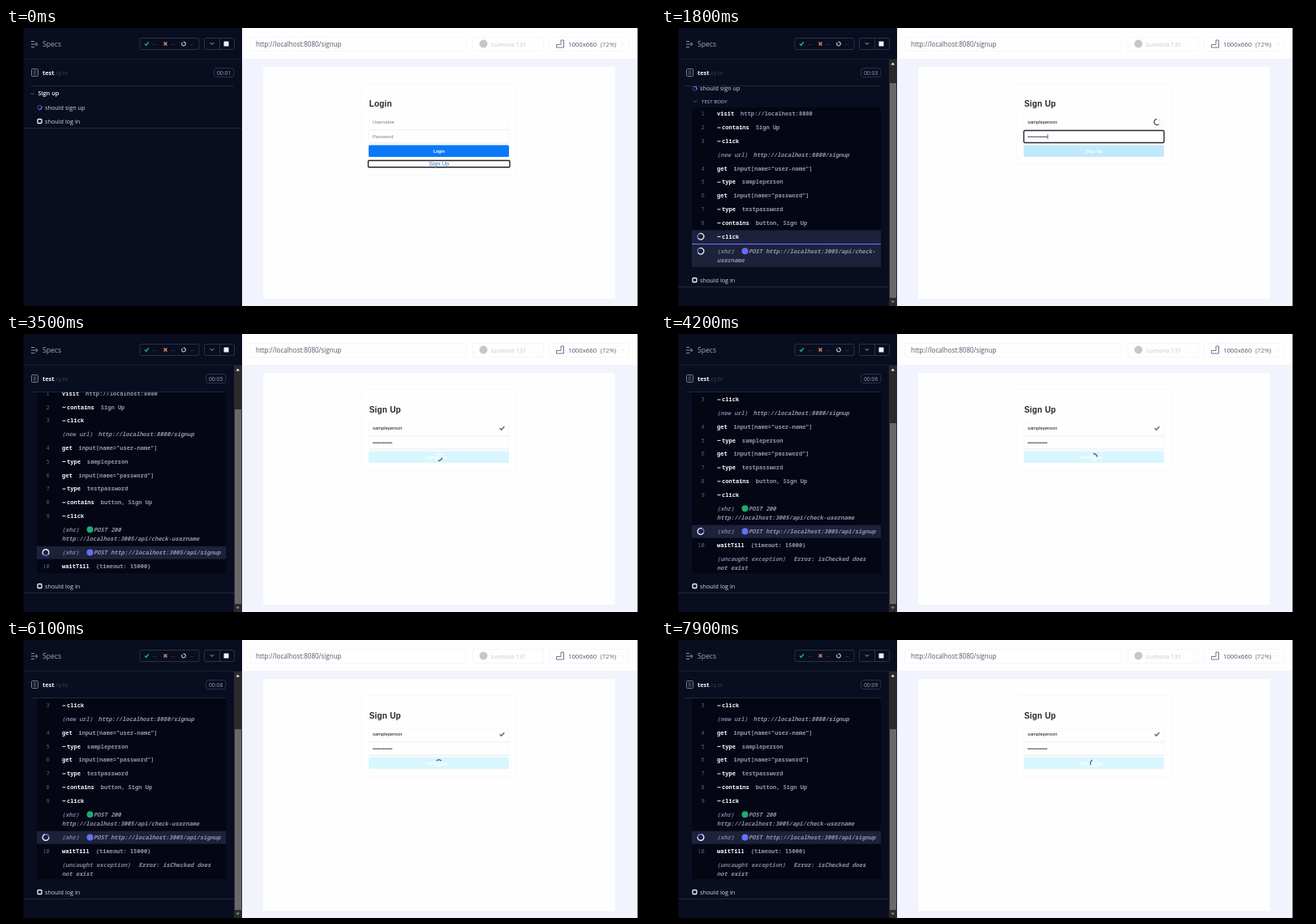
Animation, 800 px wide and 343 px high, one loop 8000 ms. Source, as an HTML page:

```html
<!DOCTYPE html>
<html lang="en">
<head>
<meta charset="utf-8">
<title>Sign up test run</title>
<style>
html, body { margin: 0; width: 100%; height: 100%; overflow: hidden; background: #000; }
svg { display: block; width: 800px; height: 343px; }
text { white-space: pre; }
.ui { font-family: "Open Sans", "Noto Sans", sans-serif; }
.mono { font-family: "Noto Sans Mono", "DejaVu Sans Mono", monospace; font-size: 7.05px; }
.form { font-family: "Liberation Sans", Arial, sans-serif; }
</style>
</head>
<body>
<svg viewBox="0 0 800 343">
  <defs><clipPath id="list"><rect x="21" y="72" width="260" height="271"/></clipPath></defs>
  <g id="base"></g>
  <g id="live"></g>
</svg>
<script>
const LOOP = 8000, STEP = 100;
const USER = 'sampleperson', PASS = 'testpassword';
const CHAR = 4.23, ROW = 16.8, WRAP = 11.5;
const WHITE = '#f3f4fa', MUTED = '#9095ad', INDIGO = '#6470f3', GREEN = '#1fa971';

// When each part of the run happens, in ms
const AT = { signup: 200, user: [300, 500], pass: [600, 900], log: 1700, progress: 1860, checked: 3100, error: 4000 };

const attrs = o => Object.entries(o).map(([k, v]) => ` ${k}="${v}"`).join('');
const el = (tag, o, body = '') => `<${tag}${attrs(o)}>${body}</${tag}>`;
const box = (x, y, width, height, fill, o = {}) => el('rect', { x, y, width, height, fill, ...o });
const frame = (x, y, w, h, stroke, rx = 2, o = {}) => box(x, y, w, h, 'none', { stroke, rx, 'stroke-width': 1, ...o });
const path = (d, stroke, width = 1, o = {}) => el('path', { d, stroke, fill: 'none', 'stroke-width': width, ...o });
const dot = (cx, cy, r, fill) => el('circle', { cx, cy, r, fill });
const text = (cls, x, y, s, size, fill, o = {}) => el('text', { class: cls, x, y, 'font-size': size, fill, ...o }, s);
const ui = (...a) => text('ui', ...a);
const form = (...a) => text('form', ...a);
const mono = (x, y, s, fill, o = {}) => el('text', { class: 'mono', x, y: y + 2.4, fill, ...o }, s);
const bold = { 'font-weight': 700 };
const middle = { 'text-anchor': 'middle' };
const slanted = { 'font-style': 'italic', 'font-weight': 600 };
const chevron = (x, y, stroke, r = 2) => path(`M${x - r} ${y - r / 2}l${r} ${r}l${r} ${-r}`, stroke);

// Arc of `sweep` degrees centred on `angle`
function arc(x, y, r, angle, sweep, stroke, width) {
  const at = a => `${x + r * Math.cos(a * Math.PI / 180)} ${y + r * Math.sin(a * Math.PI / 180)}`;
  return path(`M${at(angle - sweep / 2)}A${r} ${r} 0 ${sweep > 180 ? 1 : 0} 1 ${at(angle + sweep / 2)}`, stroke, width);
}

const turn = (t, offset) => (t * 0.36 + offset) % 360;

function spinner(x, y, t) {
  return arc(x, y, 3.8, turn(t, 90), 265, '#e4e6f3', 1.5) + arc(x, y, 3.8, turn(t, 270), 90, INDIGO, 1.5);
}

function testItem(y, label, running, t) {
  const icon = running
    ? arc(41.5, y, 2.5, 0, 359, '#343a70', 1.3) + arc(41.5, y, 2.5, turn(t, 40), 150, INDIGO, 1.3)
    : frame(39, y - 2.5, 5, 5, WHITE, 1, { 'stroke-width': 1.3 });
  return icon + ui(48, y + 2.6, label, 7.25, '#d5d8e6');
}

function drawBase() {
  let s = box(21.5, 0, 270, 343, '#090d20') + box(291, 0, 487.5, 38, '#fefefe') + box(291, 38, 487.5, 305, '#f1f4fd');
  s += box(317, 48, 433.5, 286, '#fefefe');

  // Reporter header
  s += path('M31 16.5h4M31 20h7M31 23.5h4M36.5 17.5l2.5 2.5l-2.5 2.5', '#8b90a8');
  s += ui(45, 23, 'Specs', 8.6, '#a4a8bb');
  s += frame(165, 12.5, 73, 14, '#2b3047') + frame(244.5, 12.5, 37, 14, '#2b3047') + path('M263.5 13v13', '#2b3047');
  s += path('M171 19.5l1.8 1.8l3-4', GREEN, 1.5) + path('M194.5 17.5l4 4m0-4l-4 4', '#c9835a', 1.6);
  s += arc(219, 19.5, 2.4, 60, 320, '#b9bdd0', 1.2);
  for (const x of [181, 204, 227]) s += ui(x, 22, '--', 7, '#4a4f66');
  s += chevron(254, 19.2, '#a4a8bb', 2.2) + box(268.5, 16.5, 6, 6, '#f0f1f8', { rx: 0.5 });
  s += path('M21.5 38.5H291', '#171b30');

  // Spec title
  s += frame(31.5, 50.5, 8, 9, '#777c96', 1) + path('M33.5 53h4M33.5 55h4M33.5 57h4', '#777c96', 0.8);
  s += ui(45, 58, 'test', 7.4, WHITE, bold) + ui(59.5, 58, '.cy.ts', 7.2, '#3f435a');

  // Browser bar
  s += frame(300.5, 11.5, 267, 17, '#f4f5f9') + frame(575.5, 11.5, 87, 17, '#f4f5f9') + frame(669.5, 11.5, 98, 17, '#f4f5f9');
  s += ui(308, 22.6, 'http://localhost:8080/signup', 8.03, '#565a6c');
  s += dot(588.5, 19.5, 5, '#c3cac6') + ui(598, 22.6, 'Lumora 131', 7.85, '#c6c8d2');
  s += path('M684 15h3.5v9h-9v-3.5h5.5z', '#747794', 1);
  s += ui(693, 22.6, '1000x660', 7.75, '#4b4f63') + ui(732.5, 22.6, '(72%)', 7.75, '#6d7082');
  s += chevron(760, 19.5, '#e3e5ee', 1.5);
  return s;
}

// Log rows: [kind, name, argument, second line]
const rows = [
  ['cmd', 'visit', 'http://localhost:8080'],
  ['sub', 'contains', 'Sign Up'],
  ['sub', 'click', ''],
  ['event', '(new url)', 'http://localhost:8080/signup'],
  ['cmd', 'get', 'input[name="user-name"]'],
  ['sub', 'type', USER],
  ['cmd', 'get', 'input[name="password"]'],
  ['sub', 'type', PASS],
  ['sub', 'contains', 'button, Sign Up'],
  ['sub', 'click', '']
];
const api = 'http://localhost:3005/api/';
const pending = [['xhr', INDIGO, `POST ${api}check-`, 'username']];
const answered = [
  ['xhr', GREEN, 'POST 200', `${api}check-username`],
  ['xhr', INDIGO, `POST ${api}signup`],
  ['cmd', 'waitTill', '{timeout: 15000}']
];
const failure = [['event', '(uncaught exception)', 'Error: isChecked does', 'not exist']];

function logRow([kind, name, arg, more], y, number) {
  let s = '';
  if (kind === 'xhr') {
    s += mono(69, y, '(xhr)', '#7d829b', slanted) + dot(103.5, y, 4, name) + mono(108, y, arg, MUTED, slanted);
  } else if (kind === 'event') {
    const x = 69 + name.length * CHAR + (more ? 10 : 6.6);
    s += mono(69, y, name, '#7d829b', slanted) + mono(x, y, arg, MUTED, slanted);
  } else {
    const x = kind === 'sub' ? 75 : 69;
    if (kind === 'sub') s += path(`M69.5 ${y + 0.2}h4`, WHITE);
    s += mono(53.8, y, number, '#5d627c', { 'text-anchor': 'end' });
    s += mono(x, y, name, WHITE, bold) + mono(x + name.length * CHAR + 7.9, y, arg, MUTED, { 'font-weight': 600 });
  }
  return s + (more ? mono(69, y + WRAP, more, MUTED, slanted) : '');
}

function drawLog(t) {
  const waiting = t < AT.checked, failed = t >= AT.error;
  const list = [...rows, ...(waiting ? pending : answered), ...(failed ? failure : [])];
  const top = waiting ? 106 : failed ? 47.2 : 73.3;
  let s = box(38, top - 8, 233, 295 - top + 8, '#040614');
  if (waiting) {
    s += testItem(74.6, 'should sign up', true, t) + chevron(42, 90.5, '#555a75') + ui(50, 92.8, 'TEST BODY', 6.15, '#c6c9da');
  }
  let y = top, number = 0;
  list.forEach((row, i) => {
    const busy = waiting ? i >= 9 : i === 11;
    const bar = busy && row[1] === 'click' ? 1.2 : 0;
    const height = ROW + bar + (row[3] ? WRAP : 0);
    if (busy) {
      s += box(38, y - 7.8, 233, height - 0.8, '#1d213a') + spinner(49, y, t);
    }
    if (row[0] === 'cmd' || row[0] === 'sub') number++;
    s += logRow(row, y, busy ? '' : number);
    y += height;
    if (bar) {
      const left = 38 + 233 * Math.max(0, t - AT.progress) / 4000;
      s += box(left, y - 9.2, 271 - left, 1.5, INDIGO);
    }
  });
  s += testItem(311, 'should log in') + path('M21.5 319.5H281', '#23283e');

  // Scrollbar
  const thumb = waiting ? 68 : failed ? 110 : 93;
  const bar = box(281, 39, 10, 304, '#2a2a2c') + box(282, thumb, 8, 333 - thumb, '#69696b')
    + el('path', { d: 'M283.5 45.5h4.5l-2.25-3z', fill: '#f0f0f0' }) + el('path', { d: 'M283.5 336.5h4.5l-2.25 3z', fill: '#8a8a8a' });
  return el('g', { 'clip-path': 'url(#list)' }, s) + bar;
}

function drawSuite(t) {
  return chevron(32.5, 81, '#555a75') + ui(39.5, 83.4, 'Sign up', 7.3, WHITE, { 'font-weight': 600 })
    + testItem(98, 'should sign up', true, t) + testItem(115, 'should log in') + path('M21.5 123.5H291', '#23283e');
}

const field = y => frame(447.5, y, 172.5, 16, '#f7f8fa', 1.5) + path(`M448 ${y + 16}H620`, '#e8eaf0');
const focus = y => frame(447.2, y, 172.9, 15, '#2a2d34', 1.5, { 'stroke-width': 1.4 });
const typed = (s, t, [from, to]) => s.slice(0, Math.max(0, Math.round(s.length * Math.min(1, (t - from) / (to - from)))));

function drawForm(t) {
  const login = t < AT.signup, sent = t >= AT.checked;
  let s = frame(438, 68.5, 191, login ? 112.5 : 99.5, '#f8f8fa');
  s += form(447.7, 96.8, login ? 'Login' : 'Sign Up', 10, '#23262d', { ...bold, 'letter-spacing': 0.2 }) + field(109.5) + field(126);
  const user = typed(USER, t, AT.user), pass = typed(PASS, t, AT.pass);
  s += form(452, 117.7, user || 'Username', 5.8, user ? '#15171c' : '#7b7e86');
  s += form(452, 136.2, pass ? '•'.repeat(pass.length) : 'Password', 5.8, pass ? '#15171c' : '#7b7e86');
  s += box(447, 144.5, 173, 14.6, login ? '#087af8' : sent ? '#d8f6fd' : '#c0e9fc', { rx: 1.5 });
  if (login) {
    return s + form(533.8, 153.8, 'Login', 5.2, '#fff', { ...bold, ...middle })
      + frame(446.5, 163.5, 174.5, 8.3, '#202227', 1, { 'stroke-width': 1.4 })
      + form(533.8, 169.8, 'Sign Up', 7, '#3577bd', middle);
  }
  if (sent) {
    return s + path('M608.6 116.3l2 1.9l3.7-4', '#5c5f70', 1.4)
      + form(532.5, 154, 'Signing up...', 5.2, '#fff', { ...bold, ...middle })
      + arc(533.5, 152, 4.2, 0, 359, '#f2fcff', 1.3) + arc(533.5, 152, 4.2, turn(t, 235), 95, '#53627f', 1.4);
  }
  s += form(533.8, 153.8, 'Sign Up', 5.6, '#fff', { ...bold, ...middle });
  if (t >= AT.user[0]) s += focus(t < AT.pass[0] ? 109.5 : 126.5);
  if (user === USER) {
    s += arc(611.5, 116, 3.6, 0, 359, '#e3e4e8', 1.2) + arc(611.5, 116, 3.6, turn(t, 230), 210, '#44474f', 1.2);
  }
  if (pass && t % 1000 >= 500) s += path('M476.8 131v6', '#15171c', 0.6);
  return s;
}

// The scrollbar narrows the title row
function drawTimer(t) {
  const secs = Math.floor((t + 1900) / 1000);
  const right = t < AT.log ? 281 : 271;
  return path(`M30 71.5H${right}`, '#20253a') + frame(right - 24.5, 49.5, 24.5, 11, '#2b3047', 3.5)
    + ui(right - 12.3, 57.7, `00:0${secs}`, 6.9, '#9a9fb5', middle);
}

const live = document.getElementById('live');
document.getElementById('base').innerHTML = drawBase();
const start = performance.now();
let shown = -1;

function tick() {
  const t = Math.floor((performance.now() - start) % LOOP / STEP) * STEP;
  if (t !== shown) {
    shown = t;
    live.innerHTML = drawTimer(t) + (t < AT.log ? drawSuite(t) : drawLog(t)) + drawForm(t);
  }
  requestAnimationFrame(tick);
}
tick();
</script>
</body>
</html>
```
